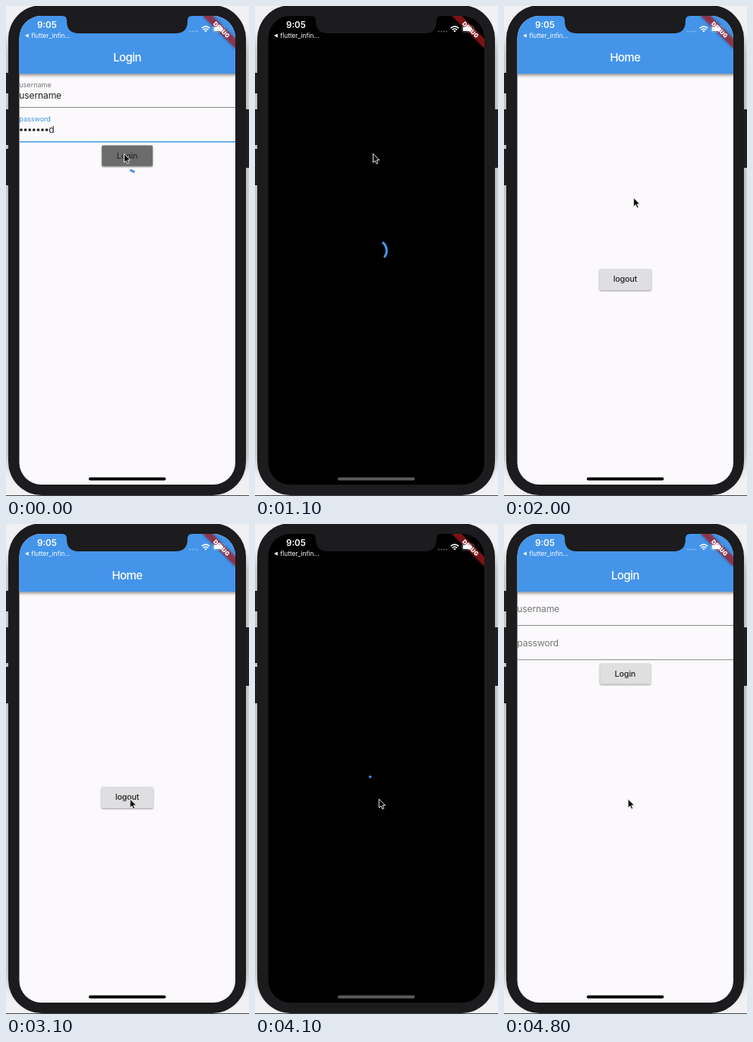
Write an HTML page that moves like this. It is 320x645 px and loops after 4.9 s.

```html
<!DOCTYPE html>
<html lang="en">
<meta charset="utf-8">
<title>Login flow</title>
<style>
html, body { margin: 0; width: 100%; height: 100%; overflow: hidden; background: #f1f0f2 }
svg { display: block; width: 320px; height: 645px; font-family: Inter, Roboto, sans-serif }
.title { font-size: 15px; font-weight: 500; letter-spacing: -.6px; fill: #fff; text-anchor: middle }
.button { font-size: 10.6px; font-weight: 500; letter-spacing: -.1px; text-anchor: middle }
.value { font-size: 12.1px; letter-spacing: -.15px; fill: #222 }
.hint { font-size: 12.1px; letter-spacing: -.15px; fill: #777 }
.label { font-size: 9.1px; letter-spacing: -.05px; fill: #777 }
.raised { filter: drop-shadow(0 1.2px 1px #0006) }
</style>
<svg viewBox="0 0 320 645">
  <defs>
    <clipPath id="screen"><rect x="17.5" y="13" width="284.5" height="617" rx="29"/></clipPath>
    <filter id="blur" x="-20%" y="-20%" width="140%" height="140%"><feGaussianBlur stdDeviation="7"/></filter>
  </defs>

  <!-- phone body -->
  <rect x="3" y="20" width="313" height="610" rx="44" opacity=".45" filter="url(#blur)"/>
  <path d="M0 88H5V115H0ZM0 136H5V183H0ZM0 188H5V236H0ZM314 136H320V213H314Z" fill="#201e20"/>
  <rect x="3" y="-1" width="313" height="645" rx="44" fill="#1c1b1d"/>
  <path d="M0 644.5H320" stroke="#444"/>

  <g clip-path="url(#screen)">
    <rect id="page" x="17" y="12" width="286" height="619"/>
    <g id="bar">
      <rect x="10" y="0" width="300" height="89" fill="#4494ea" style="filter:drop-shadow(0 2px 2px #0007)"/>
      <text id="title" class="title" x="159.5" y="73.3"></text>
    </g>

    <g id="login">
      <path d="M17 133.5H303" stroke="#8a8a8a"/>
      <path id="line" d="M17 178.7H303"/>
      <g id="filled">
        <text class="label" x="17.3" y="107">username</text>
        <text class="value" x="17.3" y="122">username</text>
        <text class="label" x="17.3" y="151.8" style="fill:#4494da">password</text>
        <g id="dots" fill="#222"></g>
        <text id="last" class="value" x="56.3" y="166.8">d</text>
      </g>
      <g id="empty" class="hint">
        <text x="17.3" y="116">username</text>
        <text x="17.3" y="160.7">password</text>
      </g>
      <rect id="loginBox" x="126.3" y="183.5" width="66.8" height="27.3" rx="1.6"/>
      <text id="loginText" class="button" x="159.6" y="200.8">Login</text>
    </g>

    <g id="home">
      <rect class="raised" x="125.8" y="346.3" width="68" height="27.6" rx="1.6" fill="#dfdee0"/>
      <text class="button" x="159.6" y="363.4" fill="#222">logout</text>
    </g>

    <path id="spinner" fill="none" stroke="#4494ea" stroke-width="3" stroke-linecap="square"/>

    <!-- debug banner -->
    <g transform="translate(302 13) rotate(45)">
      <rect x="-30.3" y="21.2" width="60.6" height="9.1" fill="#be1e23" fill-opacity=".65" style="filter:drop-shadow(0 0 2px #0009)"/>
      <text y="28.5" fill="#fff" font-size="7.6" font-weight="900" text-anchor="middle">DEBUG</text>
    </g>

    <!-- status bar -->
    <g fill="#fff">
      <text x="41" y="29" font-size="11.6" font-weight="600">9:05</text>
      <path d="M25 39L29.8 36.4V41.6Z"/>
      <text x="33.2" y="42" font-size="8.3">flutter_infin...</text>
      <path d="M242 33.5H253" stroke="#fff" stroke-width="2" stroke-linecap="round" stroke-dasharray="0 3.4" opacity=".4"/>
      <g fill="none" stroke="#fff" stroke-width="1.6">
        <path d="M257.8 29.2Q263 24.6 268.2 29.2M259.7 31.4Q263 28.6 266.3 31.4"/>
      </g>
      <path d="M263 34.6L261.2 32.7Q263 31.4 264.8 32.7Z"/>
      <rect x="272.6" y="26.2" width="15.6" height="8" rx="2" fill="none" stroke="#fff" stroke-width=".8" opacity=".4"/>
      <rect x="273.8" y="27.4" width="11" height="5.6" rx="1"/>
    </g>
    <path d="M74 12V13Q80 13 80 19V20Q80 36 96 36H223Q239 36 239 20V19Q239 13 245 13V12Z" fill="#1c1b1d"/>
    <rect id="grip" x="109" y="620.6" width="101.5" height="3.8" rx="1.9"/>
  </g>

  <path id="cursor" d="M0 0V11.5L2.7 9.1L4.5 13.2L6.4 12.4L4.7 8.3H8.3Z" stroke="#fff" stroke-width=".9" style="filter:drop-shadow(0 .8px .7px #0005)"/>
</svg>
<script>
const LOOP = 4900, STEP = 100;
const $ = id => document.getElementById(id);
const show = (id, on) => $(id).style.display = on ? '' : 'none';
const clamp = v => Math.min(1, Math.max(0, v));
const mix = (a, b, k) => a + (b - a) * k;
const grey = v => `rgb(${v},${v},${v})`;
const smooth = k => k * k * (3 - 2 * k);

// cubic-bezier(.4, 0, .2, 1)
function fastOutSlowIn(x) {
  let lo = 0, hi = 1, s;
  for (let i = 0; i < 20; i++) {
    s = (lo + hi) / 2;
    const bx = 1.2 * s * (1 - s) ** 2 + .6 * s * s * (1 - s) + s ** 3;
    if (bx < x) lo = s; else hi = s;
  }
  return s * s * (3 - 2 * s);
}

// Material progress ring, one stroke per second
function arc(age, cy) {
  const turn = Math.floor(age / 1000), k = age / 1000 - turn;
  const head = fastOutSlowIn(clamp(k * 2)), tail = fastOutSlowIn(clamp(k * 2 - 1));
  const start = Math.PI * (-.5 + 1.5 * tail + 1.7 * k - .8 * turn);
  const sweep = Math.max(1.5 * Math.PI * (head - tail), .01);
  const at = a => `${159.8 + 13.6 * Math.cos(a)} ${cy + 13.6 * Math.sin(a)}`;
  return `M${at(start)}A13.6 13.6 0 ${+(sweep > Math.PI)} 1 ${at(start + sweep)}`;
}

function pointer(t) {
  const a = smooth(clamp((t - 1200) / 600)), b = smooth(clamp((t - 2200) / 700));
  return [mix(mix(155.5, 170.7, a), 163.3, b), mix(mix(194.5, 252.5, a), 362, b)];
}

function draw(t) {
  const dark = t >= 1000 && t < 2000 || t >= 3200 && t < 4200;
  const home = t >= 2000 && t < 3200;
  const login = !dark && !home, busy = t < 1000;

  $('page').setAttribute('fill', dark ? '#000' : '#fbf9fc');
  $('grip').setAttribute('fill', dark ? '#5a5a5a' : '#000');
  show('bar', !dark);
  show('login', login);
  show('home', home);
  $('title').textContent = home ? 'Home' : 'Login';

  show('filled', busy);
  show('empty', !busy);
  show('last', t < 400);
  $('dots').lastChild.style.display = t < 400 ? 'none' : '';
  $('line').setAttribute('stroke', busy ? '#4494da' : '#8a8a8a');
  $('line').setAttribute('stroke-width', busy ? 1.6 : 1);

  const fade = clamp(t / 300);
  const box = $('loginBox');
  box.setAttribute('fill', grey(busy ? mix(108, 153, fade) : 223));
  box.style.filter = `drop-shadow(0 1.2px 1px rgba(0,0,0,${busy ? .5 * (1 - fade) : .4}))`;
  $('loginText').setAttribute('fill', grey(busy ? mix(42, 98, fade) : 34));

  show('spinner', busy || dark);
  if (busy) $('spinner').setAttribute('d', arc(t + 70, 229));
  else if (dark) $('spinner').setAttribute('d', arc(t - (t < 2000 ? 962 : 3098), 322));

  $('cursor').setAttribute('transform', `translate(${pointer(t)})`);
}

$('dots').innerHTML = Array.from({ length: 8 }, (_, i) =>
  `<circle cx="${20 + i * 5.6}" cy="163" r="1.85"/>`).join('');

const began = performance.now();
function tick() {
  const t = (performance.now() - began) % LOOP;
  draw(Math.floor(t / STEP) * STEP);
  requestAnimationFrame(tick);
}
tick();
</script>
</html>
```
